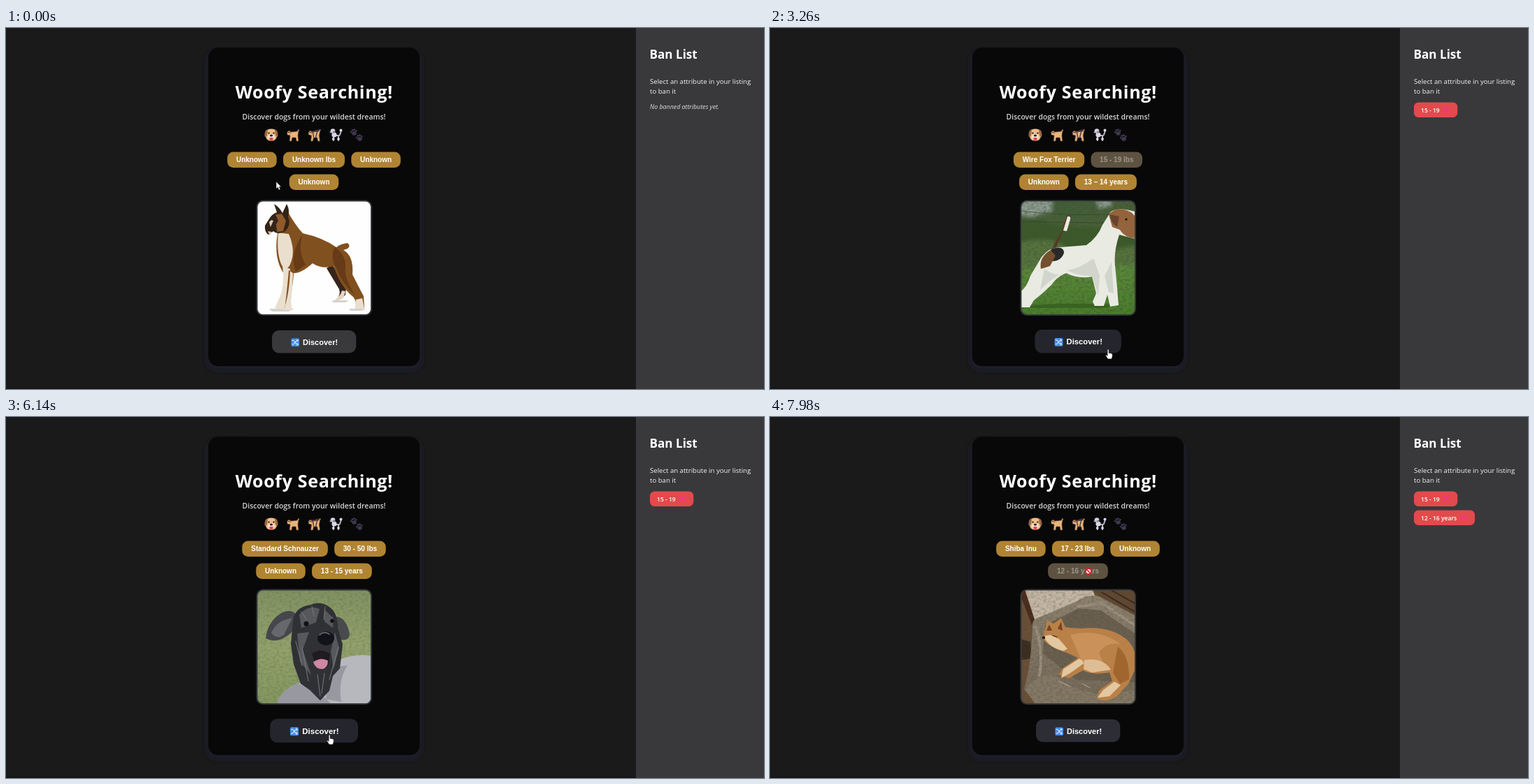
These frames come from a looping animation (1083 px wide and 517 px high, 8000 ms). An HTML page:

```html
<!DOCTYPE html>
<html lang="en">
<head>
<meta charset="utf-8">
<title>Woofy Searching!</title>
<style>
  html, body { margin: 0; width: 100%; height: 100%; overflow: hidden; background: #1a1a1a; }
  svg { display: block; width: 100%; height: 100%; }
  text { fill: #fff; font-family: "Open Sans", "Noto Sans", sans-serif; white-space: pre; }
  .title { font-size: 25px; font-weight: 700; letter-spacing: .7px; text-anchor: middle; }
  .sub { font-size: 10.45px; font-weight: 600; text-anchor: middle; fill: #d6d6d6; }
  .heading { font-size: 17.1px; font-weight: 700; }
  .note { font-size: 9.6px; fill: #f2f2f2; }
  .empty { font-size: 8.85px; font-style: italic; fill: #dedede; }
  .tag { font-size: 8.55px; font-weight: 600; }
  .pill, .go { font-family: "Liberation Sans", Arial, sans-serif; font-weight: 700; }
  .pill { font-size: 10px; text-anchor: middle; }
  .go { font-size: 11px; }
  .line { fill: none; stroke-linecap: round; stroke-linejoin: round; }
</style>
</head>
<body>
<svg viewBox="0 0 1083 517">
  <defs>
    <filter id="glow" x="-10%" y="-10%" width="120%" height="120%"><feGaussianBlur stdDeviation="3.2"/></filter>
    <filter id="soft"><feGaussianBlur stdDeviation=".6"/></filter>
    <filter id="haze"><feGaussianBlur stdDeviation="2.5"/></filter>
    <filter id="grain" x="0" y="0" width="100%" height="100%">
      <feTurbulence type="fractalNoise" baseFrequency=".22 .3" numOctaves="3" seed="4"/>
      <feColorMatrix values="0 0 0 0 .06  0 0 0 0 .08  0 0 0 0 .03  2.6 0 0 0 -1.05"/>
    </filter>
    <clipPath id="frame"><rect x="359.5" y="248.5" width="161.5" height="161.5" rx="7.5"/></clipPath>
    <linearGradient id="lawn" x2="0" y2="1">
      <stop offset="0" stop-color="#819263"/><stop offset=".5" stop-color="#93a26d"/><stop offset="1" stop-color="#84975f"/>
    </linearGradient>
    <linearGradient id="grass" x2="0" y2="1">
      <stop offset="0" stop-color="#5b8a3b"/><stop offset="1" stop-color="#467c28"/>
    </linearGradient>
    <linearGradient id="bed" x2="0" y2="1">
      <stop offset="0" stop-color="#8e8170"/><stop offset="1" stop-color="#756858"/>
    </linearGradient>
    <g id="pup">
      <path d="M8-6q2-2 0-3l-2 3-9 1-3-2-3 3 1 3 4 1-1 8h3l1-5h5l1 5h3l-1-8z" fill="#e8b57c" stroke="#5b3c2f" stroke-width=".7"/>
      <path d="M-4-7l1 5-3-2z" fill="#a36c46"/><circle cx="-6.3" cy="-4.5" r=".7"/><circle cx="-8.8" cy="-3.3" r=".9"/>
    </g>
    <g id="paw" fill="#40374f">
      <ellipse cy="2" rx="3.3" ry="2.8"/>
      <circle cx="-3.7" cy="-.8" r="1.4"/><circle cx="-1.4" cy="-3" r="1.5"/><circle cx="1.4" cy="-3" r="1.5"/><circle cx="3.7" cy="-.8" r="1.4"/>
    </g>
    <rect id="texture" x="358" y="247" width="165" height="165" filter="url(#grain)"/>
  </defs>

  <rect width="1083" height="517" fill="#1a1a1a"/>
  <rect y="515" width="900" height="2" fill="#141414"/>
  <rect x="285.5" y="32" width="309" height="459" rx="16" fill="#1a1a29" filter="url(#glow)"/>
  <rect x="289" y="28.3" width="302" height="456" rx="14" fill="#080808"/>
  <rect x="900" width="183" height="517" fill="#39393b"/>

  <text class="title" x="440.3" y="101">Woofy Searching!</text>
  <text class="sub" x="440" y="131">Discover dogs from your wildest dreams!</text>

  <g transform="translate(379 153)">
    <rect x="-8" y="-8.5" width="16" height="17" rx="6.5" fill="#edbd86"/>
    <path d="M-5-8q-5 1-4.500 10q3 3 4-4zM5-8q5 1 4.500 10q-3 3-4-4z" fill="#9b6849"/>
    <ellipse cy="3" rx="5" ry="4" fill="#f8e3cc"/>
    <path d="M-2.500 4h5v2.500q-2.500 4-5 0z" fill="#e83f68"/>
    <ellipse cy="1" rx="2.2" ry="1.5" fill="#2b2024"/>
    <circle cx="-3.5" cy="-2.5" r="1.1"/><circle cx="3.5" cy="-2.5" r="1.1"/>
  </g>
  <use href="#pup" x="410" y="154"/>
  <use href="#pup" x="440.5" y="154"/>
  <path class="line" d="M444.500 149l-2 8M438.500 148l1 8M446.500 146l-9 3" stroke="#593c47" stroke-width="1.5"/>
  <g transform="translate(471 153)">
    <path class="line" d="M5 1H-3M4 1v7M-3 1v7M6 0l2-6" stroke="#b9b2c4" stroke-width="2"/>
    <g fill="#dcd6e4">
      <circle cx="7.5" cy="-6.5" r="2"/><circle cx="-2" r="3.6"/><circle cx="-4" cy="-5.5" r="3.3"/>
      <circle cx="4" cy="6" r="1.9"/><circle cx="-3.3" cy="6" r="1.9"/>
    </g>
    <path d="M-5-6l-4 2 1 1.500 4-1z" fill="#c7bfd2"/><circle cx="-8.5" cy="-3.8" r=".9" fill="#332b3b"/><circle cx="-2.5" cy="-4" r="1.8" fill="#8d8699"/>
  </g>
  <use href="#paw" transform="translate(497 149) rotate(-15)"/>
  <use href="#paw" transform="translate(505 157) rotate(-15)"/>

  <g id="pills"></g>

  <rect x="357.5" y="246.5" width="165.5" height="165.5" rx="9.5" fill="#33363a"/>
  <g clip-path="url(#frame)">
    <g class="photo">
      <rect x="358" y="247" width="165" height="165" fill="#fefefe"/>
      <g filter="url(#soft)">
        <path d="M376 402h36l-8 4h-24zM466 390h24l-5 3h-18zM490 402h24l-6 3h-16z" fill="#d5d2cd"/>
        <path d="M466 339q13 20 20 31l-1 12-6 6-8 2q8-8 5-16l-18-30z" fill="#37241a"/>
        <path d="M480 376l5 1-3 10-9 4-3-2q8-5 10-13z" fill="#e3d5c2"/>
        <path d="M402 262Q413 282 424 294Q452 300 472 314Q478 309 488 308Q493 312 488 316L482 318Q497 326 495 353Q505 373 511 384L512 401 499 402Q502 392 496 385Q478 371 468 341Q452 346 438 337Q421 352 411 351Q410 372 405 388L398 402 397 352Q382 330 388 294Z" fill="#81501f"/>
        <path d="M470 314q-8 14 2 30q8 22 27 39q-16-24-14-40q1-18-15-29zM424 296q-8 22 4 43l-14 10q-10-26 10-53z" fill="#673b17"/>
        <path d="M389 293q-3 30 5 47q8 10 13-4q7-18-3-41zM395 341q4 30-6 49l-5 11 13 2q8-22 9-58zM404 347l6 4q-1 30-3 40l2 13h-11q4-32 6-57zM500 389l9-2 3 15h-13z" fill="#eadfcd"/>
        <path d="M370 283L375 275Q380 266 387 264L383 252Q391 257 395 265L401 252Q406 261 403 270Q408 282 399 291Q388 297 382 291L375 296Q369 292 370 283Z" fill="#332319"/>
        <path d="M385 267l9-1 6 10-4 15-9 1-1-11 3-5z" fill="#905b2a"/>
        <path d="M376 278l3-3 3 1-4 9zM374 291l6 1-3 5z" fill="#dfc9ad"/>
      </g>
    </g>
    <g class="photo">
      <rect x="358" y="247" width="165" height="100" fill="#48603a"/>
      <g filter="url(#haze)">
        <path d="M352 241h60v22l-22 2-14 6-24-4zM462 241h26v14l-18 4z" fill="#8d9c92"/>
        <path d="M404 241h60l8 22-32 10-38-8z" fill="#425f37"/>
        <path d="M352 278q30-9 50 3l50 5 78-4v50H352z" fill="#3b5a2a"/>
        <path d="M352 309q45-14 70 4t108-4v40H352z" fill="#55733c"/>
        <path d="M352 346q80-6 178-6v80H352z" fill="url(#grass)"/>
      </g>
      <use href="#texture" opacity=".5"/>
      <path class="line" d="M358 262q80 10 163 2M358 277l163 3" stroke="#303f2c" stroke-width=".6"/>
      <g filter="url(#soft)">
        <path d="M362 398q60-6 134-2l-16 5H375z" fill="#38641f"/>
        <path d="M404 330Q411 306 421 287L430 270 425 268Q419 279 419 288Q404 309 401 324Z" fill="#563a28"/>
        <path d="M419 290l6-20q5-1 4 4l-5 17z" fill="#eceadf"/>
        <path d="M487 263Q498 256 522 263V302L499 296Q491 320 493 340L496 372 498 397 486 399 482 382 477 398 464 398 461 392 466 380 460 356Q441 360 423 351Q410 356 402 368Q390 380 377 390L371 400H356V379Q367 372 372 355L388 328Q400 313 415 314L452 311Q468 300 475 282Z" fill="#e9eae2"/>
        <path d="M462 330q-18 14-38 17q18 9 36 8l9 28 2-29zM488 335l3 45-7-2-6-23zM392 345q14 10 22 8-14 8-28 22z" fill="#c3c9bd" opacity=".6"/>
        <path d="M403 316q17-5 17 6-4 12-17 12l-11-5z" fill="#292a28"/>
        <path d="M401 318l7 8-8 15-13 4q-3-17 14-27z" fill="#74502f"/>
        <path d="M484 267Q493 257 506 260Q516 262 522 270V301Q506 300 500 289L489 285Z" fill="#94633b"/>
        <path d="M486 267l13 3-3 15q-10-7-10-18z" fill="#67442b"/><circle cx="509" cy="274" r="1.5"/>
      </g>
    </g>
    <g class="photo">
      <rect x="358" y="247" width="165" height="165" fill="url(#lawn)"/>
      <use href="#texture" opacity=".22"/>
      <g filter="url(#soft)">
        <path d="M471 350q24-12 52-8v70H393q-2-15 18-26z" fill="#b7b8bd"/>
        <path d="M387 412q3-20 30-31l40 22 8 9zM488 356q-14 20-9 52l-22-4 4-45z" fill="#9899a0"/>
        <path d="M415 283Q404 271 386 286Q373 298 371 317Q382 323 394 318Q408 312 416 297Z" fill="#45474b"/>
        <path d="M379 309q8-18 30-21l-12 24q-10 8-18-3z" fill="#66686d"/>
        <path d="M471 286Q486 286 491 311Q490 321 479 319L466 303Z" fill="#484a4d"/>
        <path d="M410 293Q412 272 435 269Q449 263 462 272Q474 280 474 302L481 326 477 360 467 371 462 392 449 406 434 391 421 382 411 354 407 325Z" fill="#303135"/>
        <path d="M419 283q14-15 29-8l-5 19-21 8zM455 276l13 12-1 14-12-9zM416 310l17-2-9 25 12 37-16-20zM470 308l-6 28 4 25 8-30z" fill="#56585c"/>
        <path class="line" d="M422 279l8 12M437 271l3 14M456 272l-2 18M414 321l9 35M423 330l9 48M475 329l-13 47M445 369l4 31M455 367l-4 29" stroke="#77797e"/>
        <ellipse cx="457" cy="317" rx="12" ry="10" fill="#121318"/>
        <path d="M448 312q6-6 14-1" class="line" stroke="#5c5e66" stroke-width="2"/>
        <path d="M437 339q12-9 26 0l-2 15q-8 12-19 0z" fill="#201b20"/>
        <path d="M439 351q11-8 21-2 0 10-8 12-10 0-13-10z" fill="#cf87a4"/>
        <circle cx="429" cy="296" r="3.5" fill="#101114"/><circle cx="466" cy="292" r="2.8" fill="#101114"/>
      </g>
    </g>
    <g class="photo">
      <rect x="358" y="247" width="165" height="165" fill="#6a4f38"/>
      <g filter="url(#soft)">
        <path d="M364 247h97l4 11-27 8-62 28z" fill="#c5b7a5"/>
        <path d="M358 247h6l18 55-5 3-19-49z" fill="#4a2b1d"/>
        <path d="M461 247h62v46l-48-32z" fill="#624733"/>
        <path d="M474 251l49 29M486 247l37 21" class="line" stroke="#39271d" stroke-width="2"/>
        <path d="M358 318l14 4 2 24-16 2z" fill="#3c2b20"/>
        <path d="M375 302Q373 289 387 286L438 264Q459 250 476 260L523 285V412H382L363 390Q373 355 375 302Z" fill="url(#bed)"/>
        <path d="M393 298l48-24 32 3 48 33v70l-84-4-47-37z" fill="#6b5f51"/>
        <path d="M364 390q21-24 42-20l26 17 43 12 48-8v24H382z" fill="#857866"/>
        <path class="line" d="M379 300q12 30 6 70M441 271l34-4 46 31" stroke="#9c8f7e" stroke-width="4"/>
      </g>
      <use href="#texture" opacity=".3"/>
      <g filter="url(#soft)">
        <path d="M391 312L396 291 405 296 416 288 422 301Q440 304 458 302Q489 302 509 318Q526 333 522 361L512 382 496 400Q480 410 467 403L470 392 489 378 485 366Q461 370 447 363L427 374 413 369 418 360 440 345 423 337Q400 331 389 317Z" fill="#b98047"/>
        <path d="M391 314l9-2 13 6 12 14-6 3q-21-5-28-21zM419 361l23-15 9 5-21 15-14 8zM476 391l16-12 9 5-16 16-17 2z" fill="#e3c7a1"/>
        <path d="M429 312q39-10 72 13-22-3-31 13l8 19-28-2-7-11z" fill="#cb915a"/>
        <path d="M449 348q27-4 38 14l-27 4-12-5z" fill="#dfbd94"/>
        <path d="M497 329q17 13 16 47l-13 6-10-16z" fill="#a1652f"/>
        <path d="M395 306l4-9 4 9zM411 303l5-10 2 13z" fill="#754425"/>
        <circle cx="391" cy="316" r="2.2" fill="#28201c"/><path d="M404 313l6 2" class="line" stroke="#38251b"/>
        <path d="M412 378l17 8M446 382l12 6" class="line" stroke="#b5a793"/>
      </g>
    </g>
  </g>

  <g id="go">
    <rect id="goFill" x="380" y="433" width="120.3" height="32.5" rx="10"/>
    <rect x="407.5" y="444.5" width="11.5" height="11.5" rx="1.6" fill="#468fec"/>
    <path class="line" d="M409 447.500h2l4 5.500h2M409 453h2l4-5.500h2M415.700 446l1.700 1.500-1.700 1.500M415.700 451.500l1.700 1.500-1.700 1.500" stroke="#fff" stroke-width=".9"/>
    <text class="go" x="424" y="453.7">Discover!</text>
  </g>

  <text class="heading" x="919.5" y="44">Ban List</text>
  <text class="note" x="920" y="80.3">Select an attribute in your listing</text>
  <text class="note" x="920" y="93.8">to ban it</text>
  <text class="empty" id="empty" x="920" y="116.2">No banned attributes yet.</text>
  <g id="tags"></g>

  <g id="cursor">
    <path class="shape" d="M0 0v10.200l2.300-2 1.700 3.700 2-1-1.700-3.500h3z" fill="#fff" stroke="#111" stroke-width=".6"/>
    <path class="shape" d="M-.9.800q1-1.500 2 0v5l1-.7 1 .8 1-.4.800.9q1.200-.3 1.300.8v3.200l-1.200 3.600h-5.300l-3.200-5q.5-1.600 1.700-.4l.9 1z" fill="#fff" stroke="#111" stroke-width=".6"/>
    <g class="shape"><circle r="4" fill="#fff" stroke="#d9202b" stroke-width="1.8"/><path d="M-2.800-2.800l5.600 5.600" stroke="#d9202b" stroke-width="1.8"/></g>
  </g>
</svg>
<script>
const LOOP = 8000;
const $ = id => document.getElementById(id);
const all = selector => [...document.querySelectorAll(selector)];

// Each listing has two centred rows of [label, width].
const unknown = ["Unknown", 70.5];
const listings = [
  [[unknown, ["Unknown lbs", 88], unknown], [unknown]],
  [[["Wire Fox Terrier", 101.3], ["15 - 19 lbs", 73.5]], [unknown, ["13 – 14 years", 88]]],
  [[["Standard Schnauzer", 122.5], ["30 - 50 lbs", 73.5]], [unknown, ["13 - 15 years", 85.7]]],
  [[["Shiba Inu", 70.5], ["17 - 23 lbs", 74], unknown], [["12 - 16 years", 85.7]]]
];
const modes = {
  idle: ["#b08433", "#fff"],
  hover: ["#926522", "#fff"],
  fading: ["#78603a", "#c4beb4"],
  banned: ["#5e5340", "#9c968b"]
};

// Tracks hold each value until the next time.
const pillTrack = [
  [0, 0], [1180, 1], [2090, 1, 3, "hover"], [2220, 1, 1, "hover"],
  [2600, 1, 1, "fading"], [2730, 1, 1, "banned"], [4320, 2], [6680, 3],
  [7330, 3, 3, "hover"], [7850, 3, 3, "fading"], [7980, 3, 3, "banned"]
];
const photoTrack = [[0, 0], [1310, 1], [4450, 2], [6810, 3]];
const tagTrack = [[0, 0], [2600, 1], [7850, 2]];

const rest = [1, 0, "#2d2d36"], raised = [1.034, -.8, "#212228"];
const rising = [1.026, -.5, "#25262d"], falling = [1.014, 0, "#2b2b34"];
const pressing = [1.045, 0, "#25262d"], pressed = [1.05, 0, "#292a32"];
const buttonTrack = [
  [0, 1, 0, "#39393b"], [390, 1.01, 0, "#33333a"], [520, ...raised],
  [780, ...pressing], [910, ...pressed], [1180, ...rising], [1310, ...raised],
  [1830, ...falling], [1960, ...rest], [3260, ...rising], [3390, ...raised],
  [3680, ...pressing], [3810, ...pressed], [4450, ...rising], [4580, ...raised],
  [6140, ...pressing], [6270, 1.06, 0, "#292a32"], [6400, ...pressed],
  [6680, ...falling], [6810, ...rest]
];

const ARROW = 0, HAND = 1, BLOCKED = 2;
const cursorTrack = [
  [0, ARROW, 386, 220], [130, ARROW, 390, 242], [260, ARROW, 414, 330],
  [390, HAND, 448, 440], [520, HAND, 462, 451.5],
  [1700, HAND, 468, 440], [1830, ARROW, 482, 395], [1960, ARROW, 499, 290],
  [2090, HAND, 502.5, 210.5], [2220, HAND, 496, 196], [2350, HAND, 491, 190.5],
  [2600, BLOCKED, 492, 192], [2870, ARROW, 508, 235], [3000, ARROW, 519, 325],
  [3130, ARROW, 509, 415], [3260, HAND, 483, 460], [3390, HAND, 462.5, 456],
  [3530, HAND, 462, 455], [6680, ARROW, 466.5, 417], [6810, ARROW, 466, 382],
  [6940, ARROW, 463, 335], [7070, ARROW, 460, 288], [7200, ARROW, 457, 250],
  [7330, HAND, 454, 225], [7460, HAND, 453, 219.5], [7850, BLOCKED, 455, 221]
];

const at = (track, t) => track.findLast(step => step[0] <= t).slice(1);
const show = (nodes, index) => nodes.forEach((node, i) => node.style.display = i === index ? "" : "none");

function pillRows(listing, active, mode) {
  let index = 0;
  return listings[listing].map((row, r) => {
    const gap = 9.3, y = 177.6 + r * 31.8;
    let x = 440 - (row.reduce((sum, [, w]) => sum + w, 0) + gap * (row.length - 1)) / 2;
    return row.map(([label, width]) => {
      const [fill, ink] = modes[index++ === active ? mode : "idle"];
      const pill = `<rect x="${x}" y="${y}" width="${width}" height="22.5" rx="8.5" fill="${fill}"/>
        <text class="pill" x="${x + width / 2}" y="${y + 14.7}" style="fill:${ink}">${label}</text>`;
      x += width + gap;
      return pill;
    }).join("");
  }).join("");
}

const tagRows = count => [["15 - 19", 62.3], ["12 - 16 years", 87]].slice(0, count).map(([label, width], i) => {
  const y = 106.5 + i * 27.1, x = 920 + width - 20;
  return `<rect x="920" y="${y}" width="${width}" height="21.4" rx="6.5" fill="#e24a4c"/>
    <text class="tag" x="930" y="${y + 14.2}">${label}</text>
    <path class="line" d="M${x} ${y + 7}l7.5 7.5m0-7.5l-7.5 7.500" stroke="#f92f96" stroke-width="1.4"/>`;
}).join("");

const photos = all(".photo"), shapes = all(".shape");
let lastKey;

function draw(t) {
  const pills = at(pillTrack, t), [tags] = at(tagTrack, t);
  const [scale, dy, fill] = at(buttonTrack, t);
  const [shape, x, y] = at(cursorTrack, t);
  const key = pills + "|" + tags;
  if (key !== lastKey) {
    $("pills").innerHTML = pillRows(...pills);
    $("tags").innerHTML = tagRows(tags);
    $("empty").style.display = tags ? "none" : "";
    lastKey = key;
  }
  show(photos, at(photoTrack, t)[0]);
  show(shapes, shape);
  $("cursor").setAttribute("transform", `translate(${x} ${y})`);
  $("go").setAttribute("transform", `translate(440.1 ${449.3 + dy}) scale(${scale}) translate(-440.1 -449.3)`);
  $("goFill").setAttribute("fill", fill);
}

const start = performance.now();
function tick() {
  draw((performance.now() - start) % LOOP);
  requestAnimationFrame(tick);
}
tick();
</script>
</body>
</html>
```
